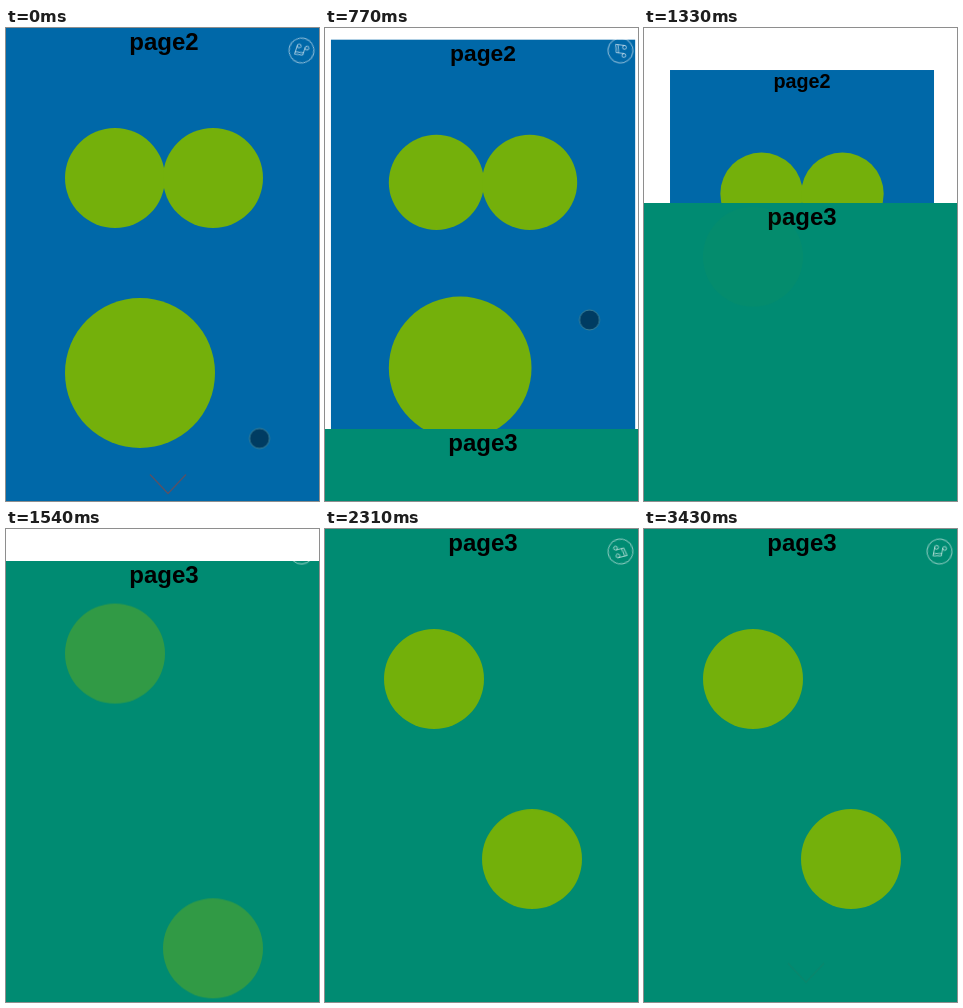
Recreate the animation shown at these times as an HTML page. Size 313x473 px, loop 3500 ms.

```html
<!DOCTYPE html>
<html lang="en">
<head>
<meta charset="utf-8">
<title>Page swipe</title>
<style>
  html, body { margin: 0; width: 100%; height: 100%; overflow: hidden; background: #fff; }
  svg { display: block; width: 100%; height: 100%; }
  text { font: bold 24px "Liberation Sans", Arial, sans-serif; text-anchor: middle; }
  .dot { fill: #74b00b; }
  .arrow { fill: none; stroke: #b03c22; stroke-width: 1.3; }

  .back, .front, .fall, .rise, .hint2, .hint3, .touch, .note {
    animation: 3500ms linear infinite;
  }
  .back  { animation-name: shrink; transform-origin: 158px 240px; }
  .front { animation-name: slide; }
  .fall  { --from: -100px; animation-name: enter; }
  .rise  { --from: 100px; animation-name: enter; }
  .hint2 { animation-name: hint2; }
  .hint3 { animation-name: hint3; }
  .touch { animation-name: drag; }
  .note  { animation-name: spin; }

  /* dragged until 36.286%, then released and eased into place */
  @keyframes shrink {
    0%, 16.714% { transform: scale(1); }
    22% { transform: scale(.9515); }
    30% { transform: scale(.894); }
    36.286% { transform: scale(.839); animation-timing-function: ease; }
    50.571%, 100% { transform: scale(.732); }
  }
  @keyframes slide {
    0%, 16.714% { transform: translateY(480px); }
    22% { transform: translateY(401px); }
    30% { transform: translateY(303px); }
    36.286% { transform: translateY(201px); animation-timing-function: ease; }
    50.571%, 100% { transform: translateY(0); }
  }
  @keyframes enter {
    0%, 36.286% { opacity: 0; transform: translateY(var(--from)); animation-timing-function: ease; }
    66.286%, 100% { opacity: 1; transform: translateY(0); }
  }
  @keyframes hint2 {
    0% { opacity: .5; transform: translateY(5px); animation-timing-function: ease-out; }
    7.2% { opacity: 1; transform: translateY(0); animation-timing-function: ease; }
    20.914%, 100% { opacity: 0; transform: translateY(-8px); }
  }
  @keyframes hint3 {
    0%, 78.914% { opacity: 0; transform: translateY(10px); animation-timing-function: ease; }
    89.2% { opacity: 1; transform: translateY(0); animation-timing-function: ease; }
    100% { opacity: .04; transform: translateY(-7.4px); }
  }
  @keyframes drag {
    0%, 16.143% { transform: translate(253.5px, 410.5px); }
    22% { transform: translate(264.5px, 292.5px); }
    30% { transform: translate(253.5px, 133.5px); }
    36% { transform: translate(240px, 8px); opacity: 1; }
    36.01%, 100% { transform: translate(240px, -40px); opacity: 0; }
  }
  @keyframes spin {
    from { transform: rotate(198deg); }
    to { transform: rotate(558deg); }
  }
</style>
</head>
<body>
<svg viewBox="0 0 313 473" preserveAspectRatio="none">
  <g class="back">
    <rect x="-2" width="320" height="480" fill="#0068a8"/>
    <text x="158" y="22">page2</text>
    <circle class="dot" cx="109" cy="150" r="50"/>
    <circle class="dot" cx="207" cy="150" r="50"/>
    <circle class="dot" cx="134" cy="345" r="75"/>
    <path class="arrow hint2" d="M144 441.5L162 460.5L180 441.5"/>
  </g>

  <g class="front">
    <rect x="-2" width="320" height="480" fill="#008b72"/>
    <text x="158" y="22">page3</text>
    <circle class="dot fall" cx="109" cy="150" r="50"/>
    <circle class="dot rise" cx="207" cy="330" r="50"/>
    <path class="arrow hint3" d="M144 441.5L162 460.5L180 441.5"/>
  </g>

  <g transform="translate(295.5 22.5)" fill="none" stroke="#fff" stroke-opacity=".6">
    <g class="note">
      <circle r="12.5"/>
      <circle cx="-4.5" cy="4" r="1.9"/>
      <circle cx="3.6" cy="3.6" r="1.9"/>
      <path d="M-2.6 4V-4L5.5 -5.5V3.6M-2.6 -1.6L5.5 -3.1"/>
    </g>
  </g>

  <circle class="touch" r="10" fill="#003c62" stroke="#3c7f94" stroke-width="1"/>
</svg>
</body>
</html>
```
